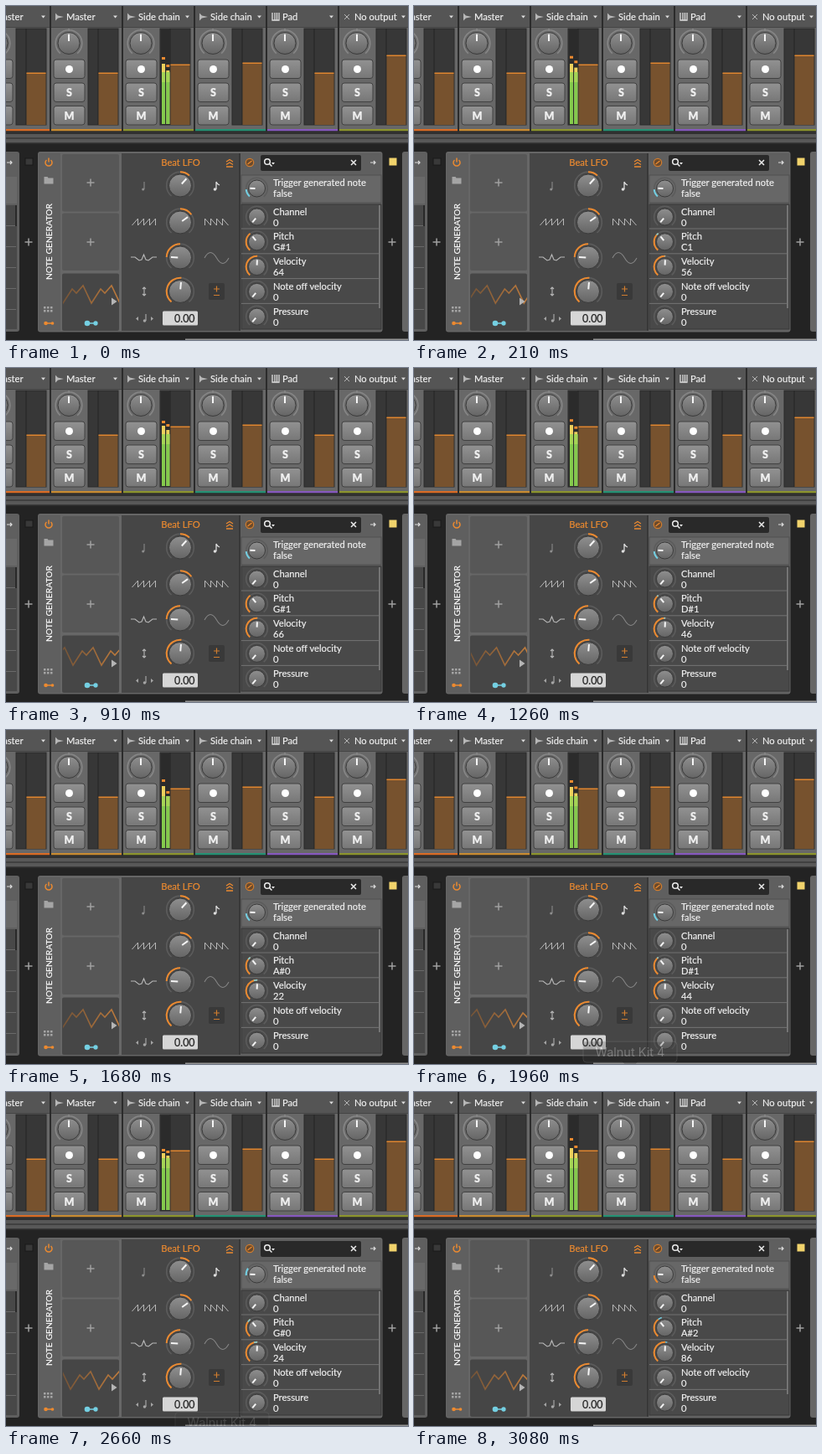
These frames come from a looping animation (480 px wide and 399 px high, 3150 ms). An HTML page:

```html
<!DOCTYPE html>
<html lang="en">
<head>
<meta charset="utf-8">
<style>
html, body { margin: 0; width: 100%; height: 100%; overflow: hidden; background: #222; }
svg { display: block; width: 100vw; height: 100vh; }
text {
  font: 11.2px Lato, "Open Sans", sans-serif;
  color: #f0f0f0; fill: currentColor; stroke: currentColor; stroke-width: .2px;
}
</style>
</head>
<body>
<svg id="stage" viewBox="0 0 480 399" xmlns="http://www.w3.org/2000/svg"></svg>
<script>
const LOOP = 3150, STEP = 70;
const ORANGE = '#ec8a30', CYAN = '#74cfe2', GREY = '#a5a5a5', PALE = '#b8b8b8';
const NOTES = ['C', 'C#', 'D', 'D#', 'E', 'F', 'F#', 'G', 'G#', 'A', 'A#', 'B'];

// time, wave trough x, note, velocity, then peak and level of the left and right meters
const KEYS = [
  [0, 102, 20, 64, 61, 69, 70, 77],
  [490, 91, 2, 46, 58, 69, 59, 69],
  [910, 80, 20, 66, 63, 69, 67, 74],
  [1680, 68, 10, 22, 59, 67, 73, 79],
  [2240, 34, 20, 65, 61, 69, 62, 72],
  [2660, 9, 8, 24, 68, 73, 70, 76],
  [3080, -17, 34, 86, 55, 67, 64, 73],
  [3150, -21, 34, 86, 55, 67, 64, 73]
];

const rect = (x, y, w, h, fill, extra = '') =>
  `<rect x="${x}" y="${y}" width="${w}" height="${h}" fill="${fill}" ${extra}/>`;
const circle = (x, y, r, fill, extra = '') =>
  `<circle cx="${x}" cy="${y}" r="${r}" fill="${fill}" ${extra}/>`;
const line = (d, stroke, width = 1) =>
  `<path d="${d}" fill="none" stroke="${stroke}" stroke-width="${width}"/>`;
const shape = (d, fill, extra = '') => `<path d="${d}" fill="${fill}" ${extra}/>`;
const text = (x, y, label, extra = '') => `<text x="${x}" y="${y}" ${extra}>${label}</text>`;
const plus = (x, y) => line(`M${x - 4.5} ${y}h9M${x} ${y - 4.5}v9`, '#a0a0a0', 1.5);
const arrow = (x, y) => line(`M${x - 3} ${y}h6m-2 -2l2 2l-2 2`, '#ddd', 1.2);

// Angles are in degrees, clockwise from twelve o'clock.
function polar(x, y, r, angle) {
  const a = angle * Math.PI / 180;
  return `${(x + r * Math.sin(a)).toFixed(2)} ${(y - r * Math.cos(a)).toFixed(2)}`;
}
function arcPath(x, y, r, from, to) {
  return `M${polar(x, y, r, from)}A${r} ${r} 0 ${+(Math.abs(to - from) > 180)} ${+(to > from)} ${polar(x, y, r, to)}`;
}
function knob(x, y, r, angle, from = angle, to = from, track = '#5c5c5c') {
  const ring = r + 2.8;
  return line(arcPath(x, y, ring, -140, 140), track, 1.6) +
    (to > from ? line(arcPath(x, y, ring, from, to), ORANGE, 2) : '') +
    circle(x, y, r, 'url(#knob)', 'stroke="#3b3b3b"') +
    line(`M${polar(x, y, r * .2, angle)}L${polar(x, y, r * .82, angle)}`, '#f5f5f5', 2);
}

function button(x, y, label) {
  return rect(x, y, 37, 22.5, 'url(#button)', 'rx="3" stroke="#414141"') +
    (label ? text(x + 18.5, y + 16, label, 'text-anchor="middle" style="font-size:12.5px;font-weight:900"')
           : circle(x + 18.5, y + 11.5, 4.5, '#fff'));
}

function strip(i, label, top, color) {
  const x = -32 + i * 86;
  let icon = shape(`M${x + 5} 8.5l3 3l7 1.5l-7 1.5l-3 3z`, PALE);
  if (label === 'Pad') icon = line(`M${x + 6} 8v9h8v-9M${x + 9} 8v9M${x + 11.5} 8v9`, '#ddd', 1.3);
  if (label === 'No output') icon = line(`M${x + 6} 10l6 6m0-6l-6 6`, PALE);
  return rect(x, 0, 84, 147, '#686868') + rect(x, 0, 84, 25, '#555') + rect(x, 25, 84, 1, '#454545') +
    icon + text(x + 18, 16.7, label) +
    shape(`M${x + 74} 11.5h5l-2.5 3z`, '#ddd') +
    line(`M${x + 21} 27v3`, '#999') + knob(x + 21, 44.5, 13, 0, 0, 0, '#868686') +
    button(x + 3, 64) + button(x + 3, 92, 'S') + button(x + 3, 119.5, 'M') +
    rect(x + 44, 27, 36, 115, '#373737', 'stroke="#2b2b2b"') + rect(x + 55.5, 27, 1, 115, '#252525') +
    rect(x + 56.5, top, 23, 142 - top, '#77522e') + rect(x + 56.5, top - .5, 23, 1.5, '#e0862f') +
    rect(x, 147, 84, 2.5, color) + rect(x - 2, 0, 2, 152, '#2b2b2b');
}

function mixer() {
  const strips = [['Master', 80, '#d96b25'], ['Master', 80, '#c88b31'], ['Side chain', 70, '#8c942d'],
    ['Side chain', 68, '#259174'], ['Pad', 80, '#8658be'], ['No output', 59, '#8c942d']];
  return strips.map((s, i) => strip(i, ...s)).join('') +
    rect(0, 149.5, 480, 3.5, '#303030') + rect(0, 153, 480, 10, '#585858') +
    rect(0, 157, 480, 2, '#404040') + rect(0, 163, 480, 1.5, '#383838');
}

function sidePanels() {
  const rows = [262, 287, 312, 337, 362].map(y => rect(0, y, 12, 1, '#696969')).join('');
  return rect(-8, 174, 24, 215, '#5f5f5f', 'rx="3"') + rect(0, 204, 13, 32, '#696969') +
    rect(0, 238, 13, 148, '#484848') + rows + rect(11, 238, 2, 25, '#292929') + arrow(4, 187) +
    rect(23, 182, 9, 8, '#393939', 'stroke="#1a1a1a"') + plus(27, 282) +
    rect(473, 174, 12, 215, '#666', 'rx="3"') +
    rect(457.5, 181.5, 9, 9, '#f1d36c') + plus(461, 282);
}

const link = (x, length, r, color) =>
  line(`M${x} 379h${length}`, color, 1.5) + circle(x, 379, r, color) + circle(x + length, 379, r * .8, color);

function deviceHeader() {
  let dots = '';
  for (let i = 0; i < 6; i++) dots += rect(45 + i % 3 * 4, 359 + (i > 2) * 4, 2.5, 2.5, GREY);
  return rect(38, 174, 411.5, 215.5, '#666', 'rx="3"') + rect(39, 176, 26, 212, '#5f5f5f') +
    line('M48.5 184a4 4 0 1 0 5 0M51 181.5v5', ORANGE, 1.5) +
    shape('M45.5 204h4l1 1.5h6v7h-11z', GREY) +
    text(0, 0, 'NOTE GENERATOR', 'transform="translate(55 327) rotate(-90)" style="font-size:10.3px;color:#fff"') +
    dots + link(47.5, 8, 2.3, ORANGE) +
    rect(65, 176, 73, 212, '#676767') +
    [177, 247.5, 319.5].map((y, i) => rect(67, y, 68, 68.5, i < 2 ? '#575757' : '#464646', 'rx="2"')).join('') +
    plus(101, 211) + plus(101, 282) + link(97, 10, 3.3, CYAN);
}

function modulator() {
  let saws = '';
  for (let i = 0; i < 4; i++)
    saws += line(`M${150.5 + i * 7} 262l7-8v8M${237.5 + i * 7} 262v-8l7 8`, PALE);
  return rect(138, 176, 140, 212, '#464646') +
    text(208.5, 191, 'Beat LFO', `text-anchor="middle" style="color:${ORANGE}"`) +
    line('M263 186l4-2.5l4 2.5m-8 3.5l4-2.5l4 2.5m-8 2.5h8', ORANGE, 1.3) +
    knob(208, 214.5, 13.5, 42, 0, 42) + knob(208, 258.5, 13.5, 55, 0, 55) +
    knob(208, 300.5, 13.5, -88, -88, 0) + knob(208, 341, 13.5, 5, -140, 5) +
    line('M165 210v9', '#8f8f8f') + circle(163.7, 219, 1.5, '#8f8f8f') +
    line('M251 210v9m0-9q1 3 4 4', '#ddd', 1.3) + circle(249.5, 219, 1.8, '#ddd') + saws +
    line('M149 300h5l5 4l3-1l2.500-6l2.500 6l3 1l5-4h5', PALE, 1.1) +
    line('M237 301q7-13 14.5 0t14.5 0', '#858585', 1.1) +
    line('M165 336v10m-2-8l2-2l2 2m-4 6l2 2l2-2', PALE, 1.1) +
    rect(242, 331, 19, 20, '#393939', 'rx="2"') +
    line('M248 338h7M251.5 334.5v7M248 345.5h7', '#d07d2f', 1.2) +
    shape('M158 371v5l-3-2.5zM173 371v5l3-2.5z', GREY) +
    line('M167 368v8', GREY, 1.2) + circle(165.5, 376, 1.8, GREY) +
    rect(187, 364.5, 42, 17, '#d6d6d6', 'rx="1.5"') +
    text(225.5, 377.5, '0.00', 'text-anchor="end" style="color:#222;font-size:12.4px"');
}

function parameters() {
  const rows = [['Channel', '0', -140], ['Pitch', '', -38], ['Velocity', '', 3],
    ['Note off velocity', '0', -140], ['Pressure', '0', -140]];
  const list = rows.map(([name, value, angle], i) => {
    const y = 252 + i * 29.8;
    return text(319, y - 2.5, name) + text(319, y + 10.5, value, `id="value${i}"`) +
      knob(299.5, y, 10, angle, -140, angle) +
      (i < 4 ? rect(281, y + 13.5, 164, 1, '#737373') : '');
  }).join('');
  return rect(278, 176, 2, 212, '#383838') + rect(280, 176, 168, 212, '#5f5f5f') +
    circle(291, 187, 4.7, '#6b4a2c', `stroke="#d07d2f" stroke-width="1.2"`) +
    line('M288.5 189l5-4', ORANGE, 1.3) +
    rect(304, 178, 120, 19, '#292929', 'rx="2"') +
    circle(312, 186, 3.3, 'none', 'stroke="#eee" stroke-width="1.5"') +
    line('M314.5 188.5l3 3', '#eee', 1.5) + shape('M317 187h4l-2 2.5z', '#eee') +
    line('M412 184l6 6m0-6l-6 6', '#eee', 1.5) + arrow(438, 187) +
    rect(281, 202, 167, 33, '#676767', 'stroke="#505050"') +
    text(319, 215, 'Trigger generated note') + text(319, 228, 'false') +
    knob(299.5, 218, 10, -88) +
    rect(281, 237, 167, 149, '#494949', 'stroke="#383838"') + rect(445, 238, 2, 123, '#747474') + list;
}

function dock() {
  const tile = (x, w, color) => rect(x, 388, w, 36, color, 'rx="2"');
  return rect(-4, 383.5, 488, 50, '#414141', 'stroke="#777"') +
    tile(1, 30, '#c9a78d') + tile(38, 27, '#c4c4c4') + circle(67, 395, 6.5, '#df5f50') +
    text(67, 398, '1', 'text-anchor="middle" style="font-size:9px"') +
    circle(96, 405, 16, '#68a6a2') + circle(138, 404, 15, '#cf6d51') +
    circle(178, 405, 15, '#555') + circle(217, 405, 18, '#f28a19') +
    tile(239, 38, '#24353b') + tile(282, 34, '#333') + tile(320, 38, '#66d0bb') + tile(361, 38, '#66d0bb') +
    circle(426, 406, 15, '#555') + circle(463, 406, 17, '#888');
}

const tooltip =
  shape('M206 341h104q4 0 4 4v17q0 4-4 4h-43l-9 9l-9-9h-43q-4 0-4-4v-17q0-4 4-4z', '#3a3a3a', 'stroke="#8a8a8a"') +
  text(258, 359, 'Walnut Kit 4', 'text-anchor="middle" style="font:14.5px Inter,sans-serif;color:#fff;stroke:none"');

const stage = document.getElementById('stage');
stage.innerHTML = `<defs>
  <linearGradient id="knob" x2="0" y2="1"><stop stop-color="#8f8f8f"/><stop offset="1" stop-color="#656565"/></linearGradient>
  <linearGradient id="button" x2="0" y2="1"><stop stop-color="#929292"/><stop offset="1" stop-color="#777"/></linearGradient>
  <linearGradient id="trace" gradientUnits="userSpaceOnUse" x1="68" x2="134"><stop stop-color="#755437"/><stop offset="1" stop-color="#bd7a3c"/></linearGradient>
  <clipPath id="scope"><path d="M68 320h67v50h-67z"/></clipPath>
</defs>` + rect(0, 0, 480, 399, '#232323') + mixer() + sidePanels() + deviceHeader() + modulator() + parameters() +
  `<g clip-path="url(#scope)"><path id="wave" fill="none" stroke="url(#trace)" stroke-width="1.6"/></g>` +
  shape('M126 348.5l6.5 4.5l-6.5 4.5z', '#b5b5b5') +
  '<g id="meters"></g><g id="modulation"></g>' + rect(214, 397.5, 266, 1.5, '#929292') +
  `<g id="dock">${dock()}</g><g id="tip">${tooltip}</g>`;

const el = id => document.getElementById(id);
const clamp = v => Math.max(0, Math.min(1, v));
const ease = v => v * v * (3 - 2 * v);

function sample(t) {
  const next = KEYS.findIndex(k => k[0] > t);
  const a = KEYS[next - 1], b = KEYS[next];
  const u = (t - a[0]) / (b[0] - a[0]);
  return a.map((v, i) => v + (b[i] - v) * u);
}

function wavePath(trough) {
  const period = 34, shift = ((trough - 68) % period + period) % period;
  return `M${68 + shift - period} 355` + 'l11-17l5 5l8-9l10 21'.repeat(3);
}

function meter(x, peak, level) {
  return rect(x, level, 4, 141 - level, '#ecd05c') + rect(x, 79, 4, 62, 'url(#button)') +
    rect(x, 79, 4, 62, '#84ca4c') + rect(x, 79, 4, 12, '#a5d455') + rect(x, peak, 4, 3, ORANGE);
}

function draw(t) {
  const [, trough, note, velocity, peakL, levelL, peakR, levelR] = sample(t);
  const n = Math.round(note);
  el('wave').setAttribute('d', wavePath(trough));
  el('value1').textContent = NOTES[n % 12] + Math.floor(n / 12);
  el('value2').textContent = Math.round(velocity);
  el('meters').innerHTML = rect(185, 28, 10.7, 114, '#2b2b2b') +
    meter(186, peakL, levelL) + meter(191.3, peakR, levelR);

  const trigger = n < 9 ? -55 : -138;
  el('modulation').innerHTML =
    line(arcPath(299.5, 218, 12.8, -95, trigger), n > 30 ? ORANGE : CYAN, 2) +
    line(arcPath(299.5, 281.8, 12.8, -38, -38 + (n - 20) * 1.5), CYAN, 1.5) +
    line(arcPath(299.5, 311.6, 12.8, 3, 3 + (velocity - 64) * .45), CYAN, 1.5);

  const shown = ease(clamp((t - 1890) / 210)), hidden = ease(clamp((t - 2400) / 280));
  const drop = 42 * (1 - shown + hidden);
  const active = t > 1890 && t < 2700;
  for (const id of ['dock', 'tip']) {
    el(id).setAttribute('transform', `translate(0 ${drop.toFixed(2)})`);
    el(id).setAttribute('visibility', active ? 'visible' : 'hidden');
  }
  el('tip').setAttribute('opacity', clamp(shown * (1 - hidden * .85)));
}

const origin = performance.now();
function tick(now) {
  const t = Math.max(0, now - origin) % LOOP;
  draw(Math.floor(t / STEP) * STEP);
  requestAnimationFrame(tick);
}
draw(0);
requestAnimationFrame(tick);
</script>
</body>
</html>
```
